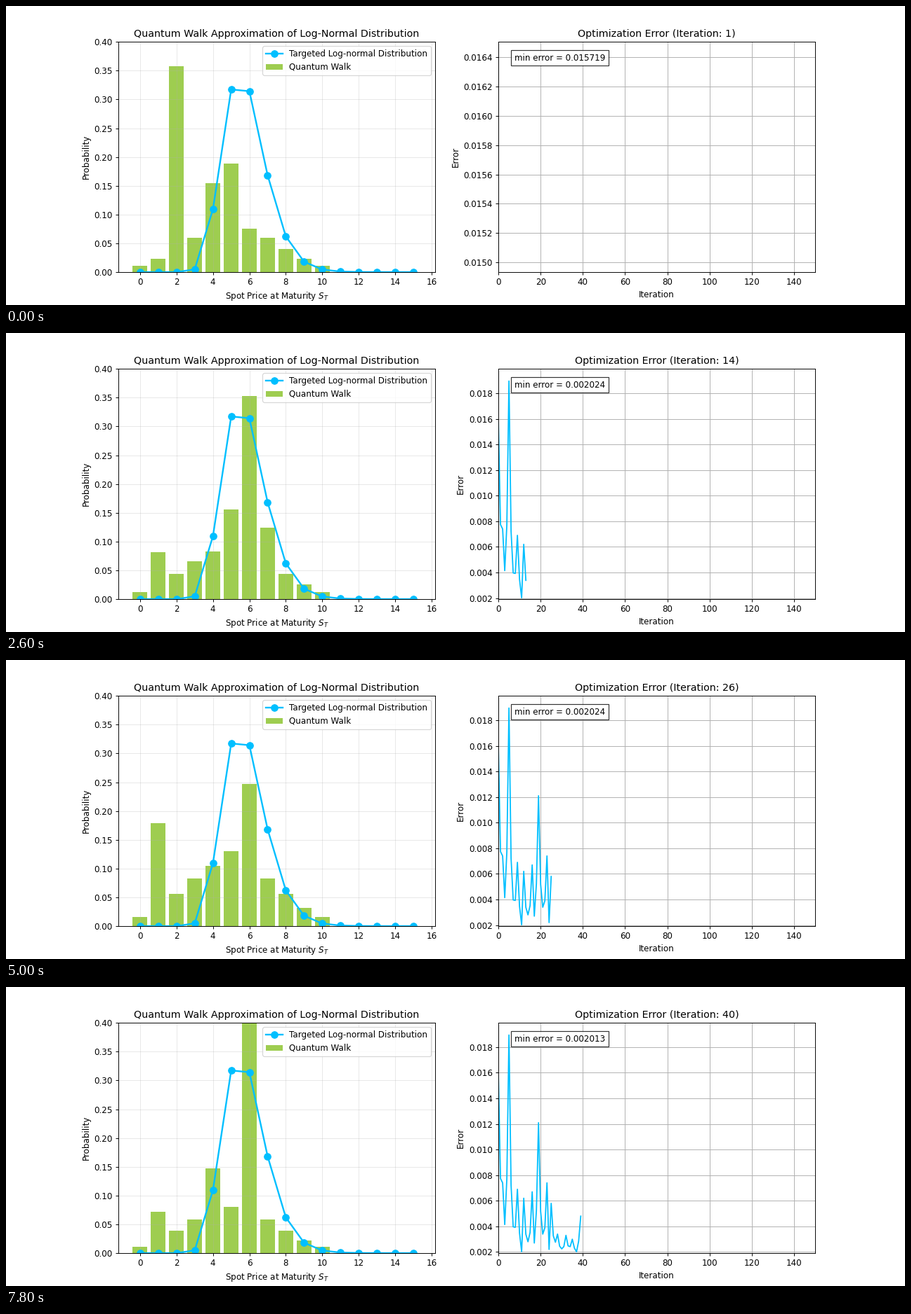
Animation, 1280 px wide and 427 px high, one loop 8000 ms. Source, as a matplotlib script:

```python
import numpy as np
import matplotlib.pyplot as plt
from matplotlib.animation import FuncAnimation

DPI = 256 / 3
SKY, GREEN = "deepskyblue", "#9ecd50"
STEPS = 40
FLOOR, DECAY = .0020, .3

prices = np.arange(16)

# Tallest bars of the walk at a few iterations
peaks = {
    0: {2: .358, 4: .154, 5: .188},
    5: {3: .167, 4: .447, 7: .187},
    13: {1: .081, 5: .156, 6: .353, 7: .124},
    20: {4: .178, 7: .148, 9: .175},
    25: {1: .179, 5: .130, 6: .247},
    33: {1: .105, 5: .169, 6: .339, 7: .140},
    39: {1: .072, 4: .147, 6: .460},
}

# Spikes and new lows of the error
turns = {0: .015719, 2: .0074, 3: .004143, 5: .01895, 9: .0069, 11: .002024,
         12: .0062, 16: .0067, 17: .0027, 19: .0121, 23: .0074, 24: .0022,
         25: .0058, 28: .0034, 32: .0033, 35: .0030, 37: .002013, 39: .0048}


def log_normal(s, median=5.7, sigma=.205):
    z = np.log(np.maximum(s, 1e-9) / median) / sigma
    return np.exp(-z ** 2 / 2) / (np.maximum(s, 1e-9) * sigma * np.sqrt(2 * np.pi))


def spread(tall):
    """Share the probability left by the tall bars as a bell over the rest."""
    bell = np.exp(-((prices - 5) / 2.5) ** 2 / 2) * (prices <= 10)
    bell[list(tall)] = 0
    walk = bell / bell.sum() * (1 - sum(tall.values()))
    walk[list(tall)] = list(tall.values())
    return walk


def neighbours(keys, i):
    keys = list(keys)
    return max(k for k in keys if k <= i), min(k for k in keys if k >= i)


def error_at(i):
    """Fall off exponentially from the turns on both sides."""
    a, b = neighbours(turns, i)
    if a == b:
        return turns[a]
    return (FLOOR + (turns[a] - FLOOR) * DECAY ** (i - a)
            + (turns[b] - FLOOR) * DECAY ** (b - i))


target = log_normal(prices)
errors = np.array([error_at(i) for i in range(STEPS)])
walks = {i: spread(tall) for i, tall in peaks.items()}


def walk_at(i):
    """Blend the nearest known walks, then scale the misfit to the error."""
    a, b = neighbours(walks, i)
    if a == b:
        return walks[a]
    t = (i - a) / (b - a)
    gap = (1 - t) * walks[a] + t * walks[b] - target
    scale = np.sqrt(errors[i] / np.mean(gap ** 2))
    return np.clip(target + scale * gap, 0, None)


fig, (left, right) = plt.subplots(
    1, 2, figsize=(1280 / DPI, 427 / DPI), dpi=DPI)

bars = left.bar(prices, walk_at(0), color=GREEN, label="Quantum Walk")
left.plot(prices, target, "o-", color=SKY, lw=2, ms=8,
          label="Targeted Log-normal Distribution")
left.set_ylim(0, 0.4)
left.set_title("Quantum Walk Approximation of Log-Normal Distribution")
left.set_xlabel("Spot Price at Maturity $S_T$")
left.set_ylabel("Probability")
left.grid(alpha=0.3)
left.legend(loc="upper right")

curve, = right.plot([], [], color=SKY)
right.set_xlim(0, 150)
right.set_xlabel("Iteration")
right.set_ylabel("Error")
right.grid()
note = right.text(0.05, 0.95, "", transform=right.transAxes, va="top",
                  bbox=dict(facecolor="white", alpha=0.8))


def update(i):
    for bar, p in zip(bars, walk_at(i)):
        bar.set_height(p)
    seen = errors[:i + 1]
    curve.set_data(np.arange(i + 1), seen)
    right.set_ylim(seen.min() * 0.95, seen.max() * 1.05)
    right.set_title(f"Optimization Error (Iteration: {i + 1})")
    note.set_text(f"min error = {seen.min():.6f}")
    return [*bars, curve, note]


anim = FuncAnimation(fig, update, frames=STEPS, interval=200,
                     init_func=lambda: update(0), repeat=True, repeat_delay=0)
plt.show()
```
